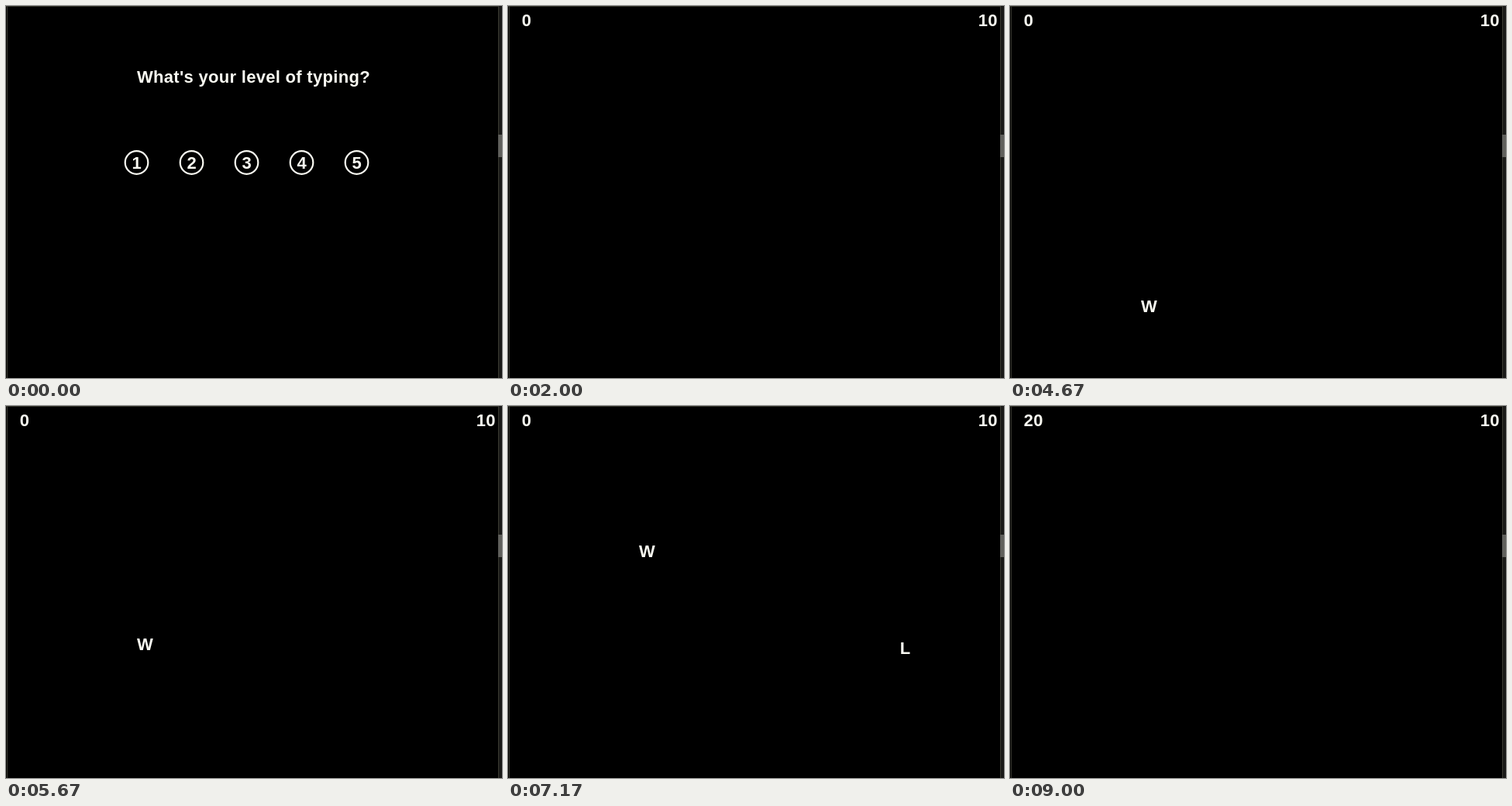
These frames come from a looping animation (640x480 px, 9330 ms). An HTML page:

```html
<!DOCTYPE html>
<html lang="en">
<head>
<meta charset="utf-8">
<title>Typing game</title>
<style>
  html, body { margin: 0; width: 100%; height: 100%; overflow: hidden; background: #000; }
  svg { display: block; width: 100vw; height: 100vh; }
  text {
    font: bold 22px "Liberation Sans", Arial, sans-serif;
    letter-spacing: .3px;
    fill: #fafaf2;
  }
  .mid { text-anchor: middle; letter-spacing: 0; }
  circle { fill: none; stroke: #fafaf2; stroke-width: 2.2; }
</style>
</head>
<body>
<svg viewBox="0 0 640 480">
  <rect width="640" height="480"/>
  <g id="edges">
    <rect width="636" height="1" fill="#36362c"/>
    <rect x="1" width="1" height="480" fill="#3a3a32"/>
    <rect x="635" width="5" height="480" fill="#1a1a18"/>
    <rect x="635" width="1" height="480" fill="#3a3a32"/>
    <rect x="635" y="166" width="5" height="29" fill="#60605c"/>
  </g>
  <g id="menu">
    <text x="169" y="99">What's your level of typing?</text>
  </g>
  <g id="game">
    <text id="score" x="17.8" y="26">0</text>
    <text x="606.8" y="26">10</text>
    <text id="riser" class="mid" x="179.5">W</text>
    <text id="slider" class="mid" y="320">L</text>
  </g>
</svg>
<script>
  const LOOP = 9330, FPS = 12;
  const START = 15;                       // step at which the game replaces the menu
  const W = { from: 47, hit: 101 };
  const L = { from: 80, hit: 106 };
  const $ = id => document.getElementById(id);
  const menu = $('menu'), game = $('game'), score = $('score');
  const riser = $('riser'), slider = $('slider');

  function add(tag, attrs, text = '') {
    const el = document.createElementNS('http://www.w3.org/2000/svg', tag);
    for (const key in attrs) el.setAttribute(key, attrs[key]);
    el.textContent = text;
    menu.append(el);
  }

  for (let i = 0; i < 5; i++) {
    const x = 168.5 + 71 * i;
    add('circle', { cx: x, cy: 202, r: 14.8 });
    add('text', { x, y: 210, class: 'mid' }, i + 1);
  }

  const show = (el, on) => el.style.display = on ? '' : 'none';
  const alive = (letter, step) => step >= letter.from && step < letter.hit;
  // Each hit is worth 10 points, counted up 5 per step.
  const points = (letter, step) => 5 * Math.max(0, Math.min(2, step - letter.hit));

  function draw(now) {
    const step = Math.floor((now % LOOP + 4) * FPS / 1000);
    show(menu, step < START);
    show(game, step >= START);
    show(riser, alive(W, step));
    show(slider, alive(L, step));
    riser.setAttribute('y', 455 - (step - W.from) * 20 / 3);
    slider.setAttribute('x', 591.3 - (step - L.from) * 13.15);
    score.textContent = points(W, step) + points(L, step);
  }

  let origin;
  function tick(now) {
    origin ??= now;
    draw(now - origin);
    requestAnimationFrame(tick);
  }
  draw(0);
  requestAnimationFrame(tick);
</script>
</body>
</html>
```
